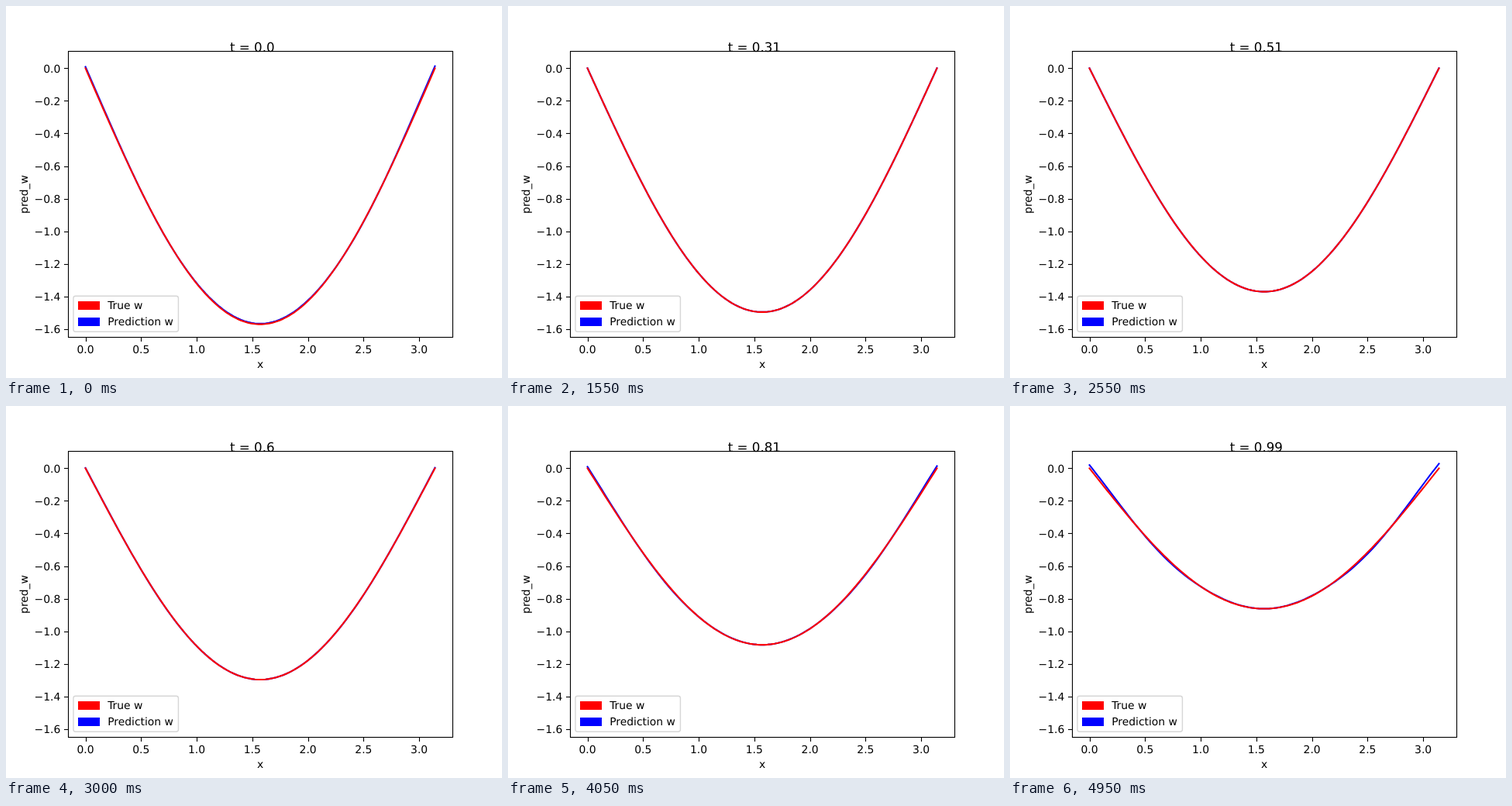
Write an HTML page that moves like this. It is 640x480 px and loops after 5 s.

```html
<!DOCTYPE html>
<html lang="en">
<head>
<meta charset="utf-8">
<title>Prediction plot</title>
<style>
  html, body { margin: 0; width: 100%; height: 100%; overflow: hidden; background: #fff; }
  svg { display: block; width: 640px; height: 480px; }
  text { font: 13.889px "DejaVu Sans", sans-serif; text-rendering: geometricPrecision; }
  .mid { text-anchor: middle; }
  .end { text-anchor: end; }
  #title { font-size: 16.667px; }
  .axis { fill: none; stroke: #000; stroke-width: 1.11; }
  .curve { fill: none; stroke-width: 2.083; stroke-linecap: square; stroke-linejoin: round; }
</style>
</head>
<body>
<svg viewBox="0 0 640 480">
  <g id="ticks"></g>
  <path id="pred" class="curve" stroke="#00f"/>
  <path id="exact" class="curve" stroke="#f00"/>
  <rect class="axis" x="80.5" y="58.5" width="496" height="369"/>
  <text id="title" class="mid" x="317.85" y="59"></text>
  <text class="mid" x="328" y="467">x</text>
  <text class="mid" transform="translate(28 243) rotate(-90)">pred_w</text>
  <rect x="86.94" y="374.2" width="135.5" height="46" rx="2.78"
        fill="#fff" stroke="#ccc" stroke-width="1.39" opacity=".8"/>
  <rect x="93" y="381" width="28" height="11" fill="#f00"/>
  <rect x="93" y="402" width="28" height="11" fill="#00f"/>
  <text x="131.2" y="391">True w</text>
  <text x="131.2" y="412">Prediction w</text>
</svg>
<script>
const STEP = 50, STEPS = 100, POINTS = 100;
const $ = id => document.getElementById(id);
const px = x => 102.55 + 143.53 * x;
const py = w => 80.35 - 210.3 * w;
const snap = v => Math.round(v) + 0.5;

function drawTicks() {
  let out = '';
  for (let i = 0; i <= 6; i++) {
    const x = px(i / 2);
    out += `<path class="axis" d="M${snap(x)} 428v5"/>
      <text class="mid" x="${x}" y="448">${(i / 2).toFixed(1)}</text>`;
  }
  for (let i = 0; i <= 8; i++) {
    const y = py(-i / 5);
    out += `<path class="axis" d="M80 ${snap(y)}h-5"/>
      <text class="end" x="70.3" y="${Math.round(y + 5.3)}">${i ? '\u2212' : ''}${(i / 5).toFixed(1)}</text>`;
  }
  $('ticks').innerHTML = out;
}

const exact = (x, t) => -Math.PI / 2 * Math.cos(t) * Math.sin(x);

// Model error: grows at both ends away from t = 0.4, ripples inside.
function error(x, t) {
  const ends = (0.057 + 0.023 * x / Math.PI) * (t - 0.4) ** 2;
  const ripple = 0.1 + 0.25 * Math.cos(2 * x) + 0.4 * Math.cos(4 * x) + 0.25 * Math.cos(6 * x);
  return ends * ripple + 0.004 * Math.exp(-15 * t) * Math.sin(x);
}

function curve(f) {
  let d = '';
  for (let i = 0; i < POINTS; i++) {
    const x = Math.PI * i / (POINTS - 1);
    d += (i ? 'L' : 'M') + px(x).toFixed(2) + ' ' + py(f(x)).toFixed(2);
  }
  return d;
}

let shown = -1;
function draw() {
  const step = Math.floor(performance.now() / STEP) % STEPS;
  if (step !== shown) {
    shown = step;
    const t = step / 100;
    $('title').textContent = 't = ' + (step ? t : '0.0');
    $('exact').setAttribute('d', curve(x => exact(x, t)));
    $('pred').setAttribute('d', curve(x => exact(x, t) + error(x, t)));
  }
  requestAnimationFrame(draw);
}

drawTicks();
draw();
</script>
</body>
</html>
```
